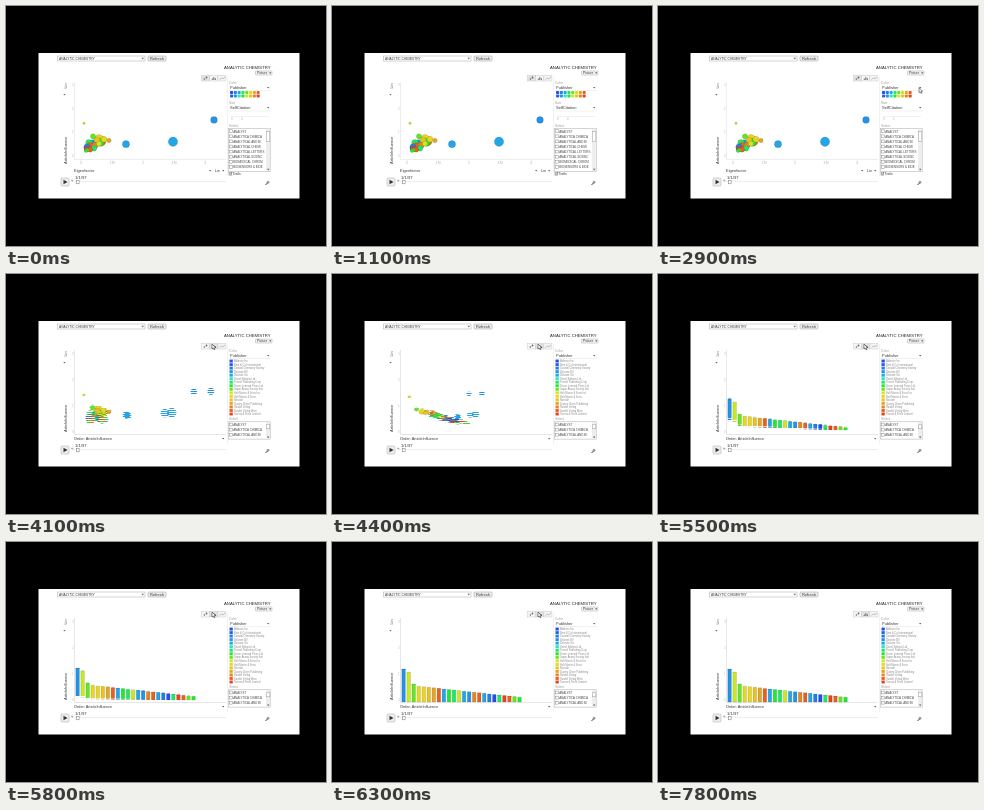
These frames come from a looping animation (320 px wide and 240 px high, 8000 ms). An HTML page:

```html
<!DOCTYPE html>
<html lang="en">
<head>
<meta charset="utf-8">
<title>Analytic chemistry chart</title>
<style>
html, body { margin: 0; height: 100%; overflow: hidden; background: #000; }
svg { display: block; width: 320px; height: 240px; font: 4px "Liberation Sans", Arial, sans-serif; }
</style>
</head>
<body>
<svg id="stage" viewBox="0 0 320 240"></svg>
<script>
const LOOP = 8000, SWITCH = 4100, BASE = 160;
const $ = id => document.getElementById(id);
const lerp = (a, b, k) => a + (b - a) * k;
const clamp = v => Math.max(0, Math.min(1, v));
const easeOut = (v, n = 2) => 1 - (1 - clamp(v)) ** n;
const range = (n, f) => Array.from({ length: n }, (_, i) => f(i)).join('');

const text = (x, y, s, size = 4, fill = '#333', more = '') =>
  `<text x="${x}" y="${y}" font-size="${size}" fill="${fill}" ${more}>${s}</text>`;
const rect = (x, y, w, h, fill = '#fff', stroke = 'none', more = '') =>
  `<rect x="${x}" y="${y}" width="${w}" height="${h}" fill="${fill}" stroke="${stroke}" stroke-width=".5" ${more}/>`;
const path = (d, stroke = '#ccc', fill = 'none', w = .5) =>
  `<path d="${d}" fill="${fill}" stroke="${stroke}" stroke-width="${w}"/>`;
const arrow = (x, y) => path(`M${x} ${y}h2.4l-1.2 1.6z`, 'none', '#666');
const upright = (x, y) => `transform="rotate(-90 ${x} ${y})"`;

const hues = [226, 220, 212, 206, 200, 170, 140, 125, 100, 68, 55, 49, 40, 30, 19, 10];
const colour = i => `hsl(${hues[i]} 80% 52%)`;

const publishers = ['Aldmoor Inc', 'Brint &amp; Co International', 'Coastal Chemistry Society', 'Delvane BV',
  'Delvane Sci', 'Ostrel Editions Ltd', 'Fennel Publishing Corp', 'Grove Learned Press Ltd',
  'Japan Assay Society Inst', 'Holt Marrin &amp; Sons Inc', 'Holt Marrin &amp; Sons', 'Norvale',
  'Quarry Chem Publishing', 'Sundel Verlag', 'Sundel Verlag Wien', 'Tarrow &amp; Finch Limited'];
const journals = ['ANALYST', 'ANALYTICA CHIMICA', 'ANALYTICAL AND BI', 'ANALYTICAL CHEMI',
  'ANALYTICAL LETTERS', 'ANALYTICAL SCIENC', 'BIOMEDICAL CHROM', 'BIOSENSORS &amp; BIOE'];

// colour index, bubble x, bubble radius; in order of bar height
const items = [
  [3, 208, 3.4], [9, 78, 1.2], [8, 87, 2.6], [10, 93, 4.2], [10, 98, 3], [11, 91, 3],
  [12, 103, 2.2], [14, 95, 5], [4, 167, 4.7], [7, 94, 4], [6, 83, 3.4], [9, 93, 2.6],
  [4, 120, 3.6], [3, 87, 5], [13, 89, 3], [14, 84, 3.4], [4, 84, 4.6], [2, 81, 3.2],
  [0, 84, 3.6], [6, 88, 2.8], [15, 81, 2.6], [14, 84, 2.6], [8, 81, 2], [7, 80, 1.8]
].map(([c, x, r], i) => {
  const h = i < 2 ? 33 - 3 * i : i === 2 ? 18 : 15.8 - .55 * (i - 3);
  return { c, x, r, h, y: 150 - h / .915, barX: 71.6 + 5.04 * i };
});
const drawOrder = [...items].sort((a, b) => b.r - a.r);

function marks(t) {
  const p = easeOut((t - 4000) / 1300);
  const q = t > 4000 ? lerp(.25, 1, easeOut((t - 4000) / 2300, 1.6)) : 0;
  const g = easeOut((t - 4900) / 1400);
  return drawOrder.map(m => {
    const w = lerp(2 * m.r, 3.6, p), flat = lerp(2 * m.r, 2, p);
    const h = Math.max(flat * (1 - g), m.h * g);
    const top = lerp(m.y, BASE - m.h, q) - (1 - g) * flat / 2;
    return rect(lerp(m.x, m.barX, p) - w / 2, top, w, h, colour(m.c), 'rgba(0,0,0,.22)',
      `rx="${lerp(w / 2, .2, g)}"`);
  }).join('');
}

function journalList(y, rows) {
  const h = rows * 5.1 + 2;
  return text(223, y - 1.5, 'Select', 3.3, '#999') + rect(222.5, y, 42, h, '#fff', '#aaa') +
    range(rows, i => rect(223.5, y + 1.3 + 5.1 * i, 2.8, 2.8, '#fff', '#888') +
      text(227.2, y + 4.2 + 5.1 * i, journals[i], 2.9, '#444')) +
    rect(260, y + .3, 4.2, h - .6, '#eee') + rect(260.4, y + 3, 3.4, rows > 3 ? 10 : 4, '#fff', '#999') +
    arrow(261, y + h - 2.5);
}

const bubbleView =
  path('M68.5 76V153.5H220M75 153.5v1.5M106 153.5v1.5M136 153.5v1.5M168 153.5v1.5M199 153.5v1.5', '#ddd') +
  range(5, i => text(75 + 31 * i, 158, ['0', '1.M', '2', '3.M', '4'][i], 3, '#aaa', 'text-anchor="middle"')) +
  range(4, i => text(66, 80 + 23.5 * i, 3 - i, 3, '#bbb')) +
  text(68, 166.3, 'Eigenfactor') + text(209, 166.3, 'Lin', 3.6) + arrow(216, 164) + arrow(203, 164) +
  range(16, i => rect(224 + 3.8 * (i >> 1), 85 + 3.5 * (i % 2), 3.1, 3, colour(i), 'none', 'rx=".8"')) +
  text(223, 98, 'Size', 3.3, '#999') + text(224, 103, 'SelfCitation') + arrow(261, 101) +
  path('M223 105H265M225 110.5H263', '#e2e2e2') + text(225, 114, '0', 2.8, '#aaa') + text(235, 114, '4', 2.8, '#aaa') +
  journalList(122.5, 8) + rect(223, 166.3, 2.8, 2.8, '#fff', '#777') +
  path('M223.5 167.5l.8 1 1.4-2', '#333') + text(226.5, 169, 'Trails', 3.4);

const barView =
  path('M68.5 76V160.5H220', '#ccc') +
  range(4, i => text(66, 81 + 26 * i, 3 - i, 3, '#bbb')) +
  text(68, 166.3, 'Order: ArticleInfluence', 3.85) + arrow(216, 164) +
  range(16, i => rect(223.5, 85.6 + 3.53 * i, 3.3, 2.9, colour(i)) +
    text(228, 88.2 + 3.53 * i, publishers[i], 2.6, '#888')) +
  journalList(147.8, 3);

$('stage').innerHTML = `<defs>${[0, 1].map(f => `<clipPath id="rows${f}"><path d="${
    range(60, i => `M60 ${60 + 2 * i + f}h160v1H60z`)}"/></clipPath>`).join('')}</defs>` +
  rect(0, 0, 320, 240, '#000') + rect(32.5, 47, 261, 145.5) +
  rect(51.5, 50, 87.5, 5, '#fff', '#aaa') + text(53, 53.7, 'ANALYTIC CHEMISTRY', 3.25) + arrow(135.5, 51.8) +
  rect(142, 50, 18, 5, '#eee', '#999', 'rx=".8"') + text(144, 53.9, 'Refresh') +
  text(218, 62.7, 'ANALYTIC CHEMISTRY', 4.25, '#222') +
  rect(249.5, 65, 16.5, 4, '#f5f5f5', '#aaa', 'rx=".6"') + text(251, 68.3, 'Picture', 3.3) + arrow(263, 66.3) +
  range(3, i => rect(195.5 + 8.2 * i, 69.5, 8, 5.5, '#f4f4f4', '#ccc', `id="tab${i}"`)) +
  '<g fill="#666"><circle cx="198.4" cy="73" r=".8"/><circle cx="200.5" cy="71.5" r=".9"/></g>' +
  path('M206.3 74v-1.5M207.8 74v-3M209.3 74v-2', '#666', 'none', .9) + path('M213.5 73.5l2-1.5 1.5.8 2-1.8', '#888') +
  path('M221.5 70V170', '#e4e4e4') +
  text(60.5, 158, 'ArticleInfluence', 4, '#333', upright(60.5, 158)) +
  text(60.5, 82.5, 'Lin', 3.8, '#555', upright(60.5, 82.5)) + arrow(57.3, 88) +
  text(223, 78, 'Color', 3.3, '#999') + text(224, 83, 'Publisher') + arrow(261, 81) + path('M223 84.5H265', '#e2e2e2') +
  `<g id="bubbleView">${bubbleView}</g><g id="barView">${barView}</g>` +
  '<g id="field0" clip-path="url(#rows0)"></g><g id="field1" clip-path="url(#rows1)"></g>' +
  rect(55, 172, 8, 8, '#eee', '#aaa', 'rx="1"') + path('M57.5 173.7v4.6l4-2.3z', 'none', '#333') +
  path('M66 175.5H220', '#ddd') + text(69, 173.2, '1/1/97', 4.2) +
  path('M65 174.5h2.4M66.2 173.3v2.4', '#888') + rect(70.5, 174.5, 2.6, 3.3, '#fff', '#777') +
  path('M259.5 179l2.3-2.3', '#444', 'none', 1) + '<circle cx="262" cy="176.3" r="1" fill="none" stroke="#444" stroke-width=".6"/>' +
  `<g id="cursor">${path('M0 0v5l1.2-1 .8 1.8 .9-.4-.8-1.7h1.5z', '#222', '#fff')}</g>`;

// time, x, y
const route = [[2400, 294, 102], [2700, 272, 84], [2800, 272, 84], [3400, 206, 70], [7300, 206, 70], [7600, 294, 96]];

function pointer(t) {
  const i = route.findIndex(r => r[0] > t);
  if (i < 1) return null;
  const [a, b] = [route[i - 1], route[i]], k = (t - a[0]) / (b[0] - a[0]);
  return [lerp(a[1], b[1], k), lerp(a[2], b[2], k)];
}

let last = -1;
function draw(now) {
  const t = Math.floor(now % LOOP / 100) * 100;
  if (t !== last) {
    last = t;
    const bars = t >= SWITCH;
    $('bubbleView').style.display = bars ? 'none' : '';
    $('barView').style.display = bars ? '' : 'none';
    $('tab0').setAttribute('fill', t < 3900 ? '#e2e2e2' : '#f6f6f6');
    $('tab1').setAttribute('fill', t < 3900 ? '#f6f6f6' : '#e2e2e2');
    // interlaced fields: alternate rows lag a little
    $('field0').innerHTML = marks(t - 85);
    $('field1').innerHTML = marks(t);
    const at = pointer(t);
    $('cursor').style.display = at ? '' : 'none';
    if (at) $('cursor').setAttribute('transform', `translate(${at})`);
  }
  requestAnimationFrame(draw);
}
requestAnimationFrame(draw);
</script>
</body>
</html>
```
